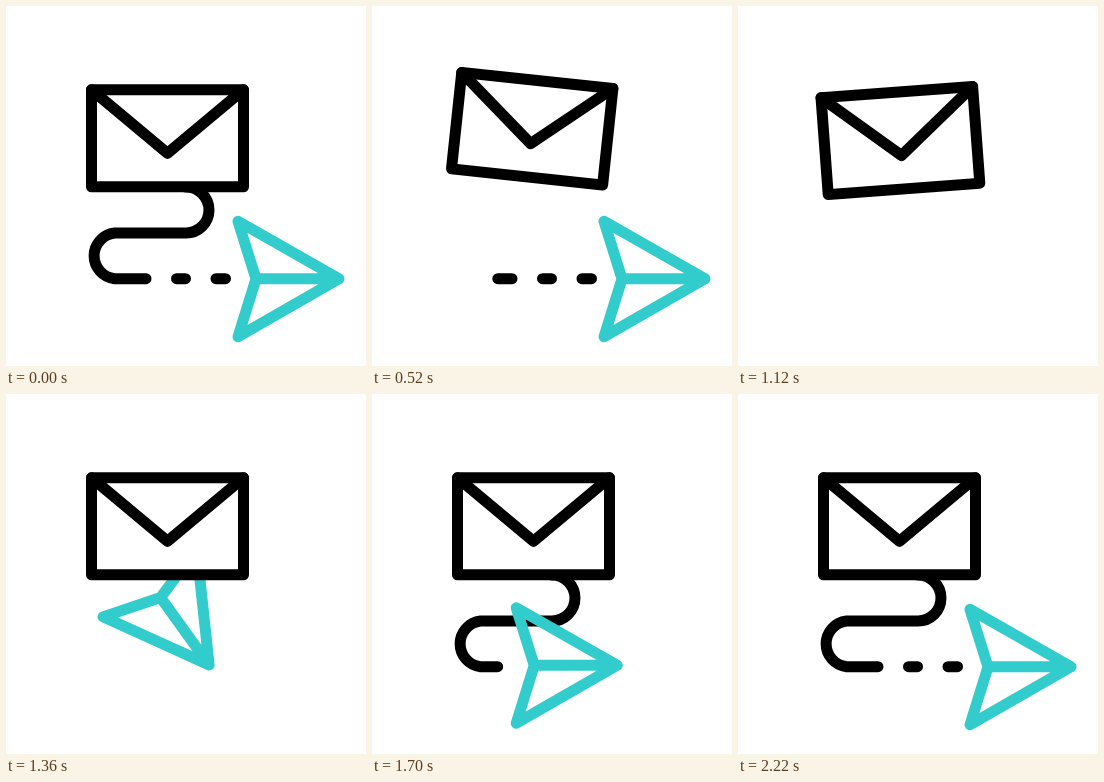
Write an HTML page that moves like this. It is 360x360 px and loops after 2.4 s.

```html
<!DOCTYPE html>
<html lang="en">
<head>
<meta charset="utf-8">
<title>Mail sending</title>
<style>
  html, body { margin: 0; width: 100%; height: 100%; overflow: hidden; background: #fff; }
  svg { display: block; width: 100%; height: 100%; }

  :root { --sine: cubic-bezier(.37, 0, .63, 1); }

  .line { fill: none; stroke: #000; stroke-width: 11; stroke-linecap: round; stroke-linejoin: round; }
  .teal { stroke: #3cc; }

  .line, .mail { animation: 2400ms linear infinite; }

  .mail {
    transform-origin: 161.5px 120px;
    animation-name: bob, tilt;
    animation-timing-function: var(--sine);
  }
  @keyframes bob {
    0%, 9.167% { translate: 0 0; }
    19.167% { translate: 0 -11px; }
    33.333% { translate: 0 8px; }
    54.167%, 100% { translate: 0 0; }
  }
  @keyframes tilt {
    0%, 9.167% { rotate: 0deg; }
    18.333% { rotate: 7deg; }
    32.5% { rotate: 0deg; }
    44.167% { rotate: -5deg; }
    54.167%, 100% { rotate: 0deg; }
  }

  /* Leaves to the right, then drops out from behind the envelope. */
  .plane { animation-name: fly, turn; }
  @keyframes fly {
    0% { translate: 283px 272.8px; }
    28.917% { translate: 283px 272.8px; animation-timing-function: cubic-bezier(.33, 0, .67, .33); }
    37.5% { translate: 423px 272.8px; animation-timing-function: step-end; }
    37.51%, 52.5% { translate: 172px 110px; }
    56.667% { translate: 174px 230px; }
    60.833% { translate: 162px 261px; }
    65% { translate: 168px 268.5px; }
    70.833% { translate: 195px 271.3px; }
    75.833% { translate: 221px 272px; animation-timing-function: cubic-bezier(.33, .46, .67, .9); }
    92.5%, 100% { translate: 283px 272.8px; }
  }
  @keyframes turn {
    0%, 37.5% { rotate: 0deg; }
    37.51%, 52.5% { rotate: 90deg; }
    56.667% { rotate: 54.5deg; }
    60.833% { rotate: 26deg; }
    65% { rotate: 8deg; }
    70.833%, 100% { rotate: 0deg; }
  }

  /* Each stroke is erased from its start, then drawn from its start. */
  .trail { stroke-dasharray: 253 999; animation-name: trail; }
  @keyframes trail {
    0%, 9.167% { stroke-dashoffset: 0; }
    21.667% { stroke-dashoffset: -226.5; }
    23.333% { stroke-dashoffset: -254; animation-timing-function: step-end; }
    23.34%, 56.667% { stroke-dashoffset: 254; }
    70.833% { stroke-dashoffset: 26.5; }
    72.917%, 100% { stroke-dashoffset: 0; }
  }
  .dash { stroke-dasharray: 10 99; }
  .near { animation-name: near; }
  .far { animation-name: far; }
  @keyframes near {
    0%, 28.333% { stroke-dashoffset: 0; }
    30% { stroke-dashoffset: -11; animation-timing-function: step-end; }
    30.01%, 78.333% { stroke-dashoffset: 11; }
    79.167%, 100% { stroke-dashoffset: 0; }
  }
  @keyframes far {
    0%, 33.75% { stroke-dashoffset: 0; }
    35.417% { stroke-dashoffset: -11; animation-timing-function: step-end; }
    35.43%, 85% { stroke-dashoffset: 11; }
    85.833%, 100% { stroke-dashoffset: 0; }
  }
</style>
</head>
<body>
<svg viewBox="0 0 360 360">
  <clipPath id="below"><rect y="150" width="360" height="210"/></clipPath>

  <path class="line trail" d="M180 181a23 23 0 0 1 0 46H108.500a23 23 0 0 0 0 45.700H140"/>
  <path class="line dash near" d="M170.500 272.700h9"/>
  <path class="line dash far" d="M210 272.700h9.500"/>

  <g clip-path="url(#below)">
    <path class="line teal plane" d="M50 0L-51 -57.500L-33 0L-51 58ZM-33 0H50"/>
  </g>

  <g class="mail">
    <rect class="line" x="85.500" y="83.800" width="152" height="97" style="fill:#fff"/>
    <path class="line" d="M85.500 83.800L161.500 147.300L237.500 83.800"/>
  </g>
</svg>
</body>
</html>
```
